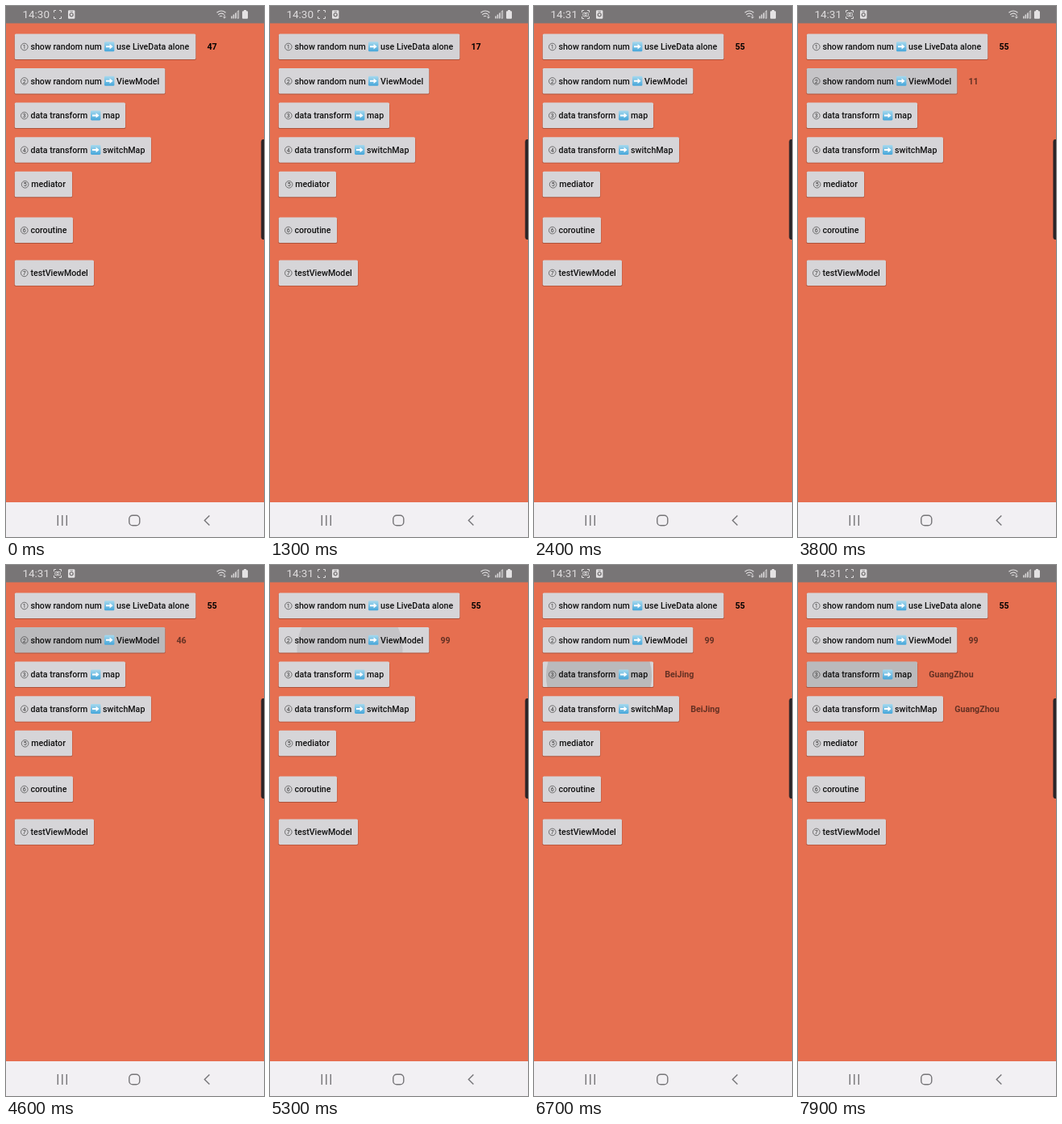
These frames come from a looping animation (320 px wide and 657 px high, 8000 ms). An HTML page:

```html
<!DOCTYPE html>
<html lang="en">
<head>
<meta charset="utf-8">
<title>LiveData demo</title>
<style>
html, body { margin: 0; width: 100%; height: 100%; overflow: hidden; background: #e66f50; }
svg { display: block; width: 100%; height: 100%; }
text { font-family: Roboto, "Noto Sans", sans-serif; font-size: 10.67px; white-space: pre; }
.label { font-weight: 500; fill: #111; }
.num { font-size: 7px; fill: #333; text-anchor: middle; }
.value { font-weight: 700; fill: #000; }
.soft { fill-opacity: .56; }
.clock { font-size: 13.5px; fill: #dedcdd; }
.line { fill: none; stroke: #dedcdd; }
.solid { fill: #e4e2e3; }
.nav { fill: none; stroke: #757477; stroke-width: 1.4; }
</style>
</head>
<body>
<svg id="stage" viewBox="0 0 320 657">
  <defs>
    <linearGradient id="sky" x1="0" y1="0" x2="0" y2="1">
      <stop offset="0" stop-color="#a6d9ee"/>
      <stop offset="1" stop-color="#45a6da"/>
    </linearGradient>
    <g id="arrow">
      <rect width="12.4" height="12" rx="1.4" fill="url(#sky)"/>
      <path d="M2 5H6.6V2.8L10.6 6 6.6 9.2V7H2z" fill="#fff"/>
    </g>
  </defs>
  <rect width="320" height="657" fill="#e66f50"/>

  <rect width="320" height="21.4" fill="#787576"/>
  <text id="clock" class="clock" x="20.4" y="15.4">14:30</text>
  <path class="line" d="M59.5 8V5.5H62M66 5.5H68.5V8M68.5 13V15.5H66M62 15.5H59.5V13"/>
  <g id="eye" class="line" stroke-width=".9">
    <rect x="60.8" y="8.5" width="6.6" height="4.2" rx="1"/>
    <circle cx="64.1" cy="10.6" r="1.2"/>
  </g>
  <rect class="solid" x="77" y="5.2" width="8.4" height="10.6" rx="1.2"/>
  <circle cx="81.2" cy="10.8" r="2" fill="none" stroke="#787576" stroke-width="1.3"/>
  <path d="M79.5 7H83" stroke="#787576" stroke-width=".8"/>
  <g class="line" stroke-width="1.2">
    <path d="M261.5 8.2Q267 3.8 272.5 8.2M263.2 10.7Q267 7.6 270.4 10.4M265 13Q266.8 11.6 268.2 12.8"/>
    <path d="M271 10.5V15M269.4 13.6L271 15.2 272.6 13.6" stroke-width="1"/>
    <path d="M280 12.5V15.5M282.4 10.5V15.5M284.8 8.5V15.5" stroke-width="1.5"/>
    <path d="M287 15.2V6.8L288.6 5.6V15.2z" stroke-width=".8"/>
  </g>
  <path class="solid" d="M295 5h3v1.2h1q1 0 1 1v7.6q0 1-1 1h-5q-1 0-1-1V7.2q0-1 1-1h1z"/>

  <g id="rows"></g>

  <path d="M320 165h-1q-2.6 0-2.6 3.4v117.2q0 3.4 2.6 3.4h1z" fill="#2b2427"/>

  <rect y="614" width="320" height="43" fill="#f2f0f3"/>
  <path class="nav" d="M64.3 630V643M69.8 630V643M75.3 630V643"/>
  <rect class="nav" x="152.8" y="630.2" width="13" height="12.6" rx="4.4"/>
  <path class="nav" d="M252.4 630.4L246.3 636.5 252.4 642.6"/>
</svg>
<script>
const NS = 'http://www.w3.org/2000/svg';
const LOOP = 8000, STEP = 100, LEFT = 10.8, HEIGHT = 31.5;

// top, right edge, label, label x, arrow x, second label
const rows = [
  [34.5, 235.3, 'show random num', 30.4, 122, 'use LiveData alone'],
  [77, 197.3, 'show random num', 30.4, 122, 'ViewModel'],
  [119.6, 148, 'data transform', 30.4, 105, 'map'],
  [162.2, 180, 'data transform', 30.4, 105, 'switchMap'],
  [204.8, 82, 'mediator', 31.2],
  [261.6, 83, 'coroutine', 30.4],
  [314.4, 109, 'testViewModel', 30.4]
];

// time, row, ripple centre x and y, first ripple alpha
const presses = [
  [900, 0, 120, 58, .09], [1900, 0, 120, 58, .09],
  [3600, 1, 99, 104, .08], [4500, 1, 99, 104, .08], [5300, 1, 99, 104, .08],
  [6700, 2, 80.5, 137, .13], [7800, 2, 80.5, 137, .13]
];
const FADE = [.13, .08, .045, .015];

// value text per row: [from time, text]
const values = [
  [[0, '47'], [900, '17'], [1900, '55']],
  [[0, ''], [3600, '11'], [4500, '46'], [5300, '99']],
  [[0, ''], [6700, 'BeiJing'], [7800, 'GuangZhou']],
  [[0, ''], [6700, 'BeiJing'], [7800, 'GuangZhou']]
];

const byId = id => document.getElementById(id);

function add(parent, tag, attrs, text) {
  const el = document.createElementNS(NS, tag);
  for (const key in attrs) el.setAttribute(key, attrs[key]);
  if (text) el.textContent = text;
  return parent.appendChild(el);
}

function buildRow([y, right, label, x, arrowX, label2], i) {
  const g = add(byId('rows'), 'g', {});
  const box = { x: LEFT, y, width: right - LEFT, height: HEIGHT, rx: 1.6 };
  const base = y + 19.5;
  add(g, 'rect', { ...box, x: LEFT - .4, width: box.width + .8, y: y + .9, fill: '#000', 'fill-opacity': .25 });
  add(g, 'rect', { ...box, fill: '#d6d5d8' });
  const clip = add(g, 'clipPath', { id: 'clip' + i });
  add(clip, 'rect', box);
  const ripple = add(g, 'circle', { 'clip-path': `url(#clip${i})` });
  add(g, 'circle', { cx: x - 7.6, cy: y + 16, r: 4.3, fill: 'none', stroke: '#444', 'stroke-width': .7 });
  add(g, 'text', { class: 'num', x: x - 7.6, y: y + 18.5 }, String(i + 1));
  add(g, 'text', { class: 'label', x, y: base }, label);
  if (arrowX) {
    add(g, 'use', { href: '#arrow', x: arrowX, y: y + 9.8 });
    add(g, 'text', { class: 'label', x: arrowX + 15.1, y: base }, label2);
  }
  const value = add(g, 'text', { class: i ? 'value soft' : 'value', x: right + 14.2, y: base });
  return { ripple, value };
}

const parts = rows.map(buildRow);

function draw(t) {
  byId('clock').textContent = t < 1700 ? '14:30' : '14:31';
  byId('eye').style.opacity = (t + 600) % 1000 < 500 ? 1 : 0;
  values.forEach((list, i) => {
    parts[i].value.textContent = list.filter(v => v[0] <= t).pop()[1];
  });
  parts.forEach(p => p.ripple.setAttribute('fill-opacity', 0));
  for (const [start, row, cx, cy, alpha] of presses) {
    const age = (t - start) / STEP;
    if (age < 0 || age > FADE.length) continue;
    const c = parts[row].ripple;
    c.setAttribute('cx', cx);
    c.setAttribute('cy', cy);
    c.setAttribute('r', age ? 240 : 65.5);
    c.setAttribute('fill-opacity', age ? FADE[age - 1] : alpha);
  }
}

const began = performance.now();
function tick() {
  const t = (performance.now() - began) % LOOP;
  draw(Math.floor(t / STEP) * STEP);
  requestAnimationFrame(tick);
}
tick();
</script>
</body>
</html>
```
